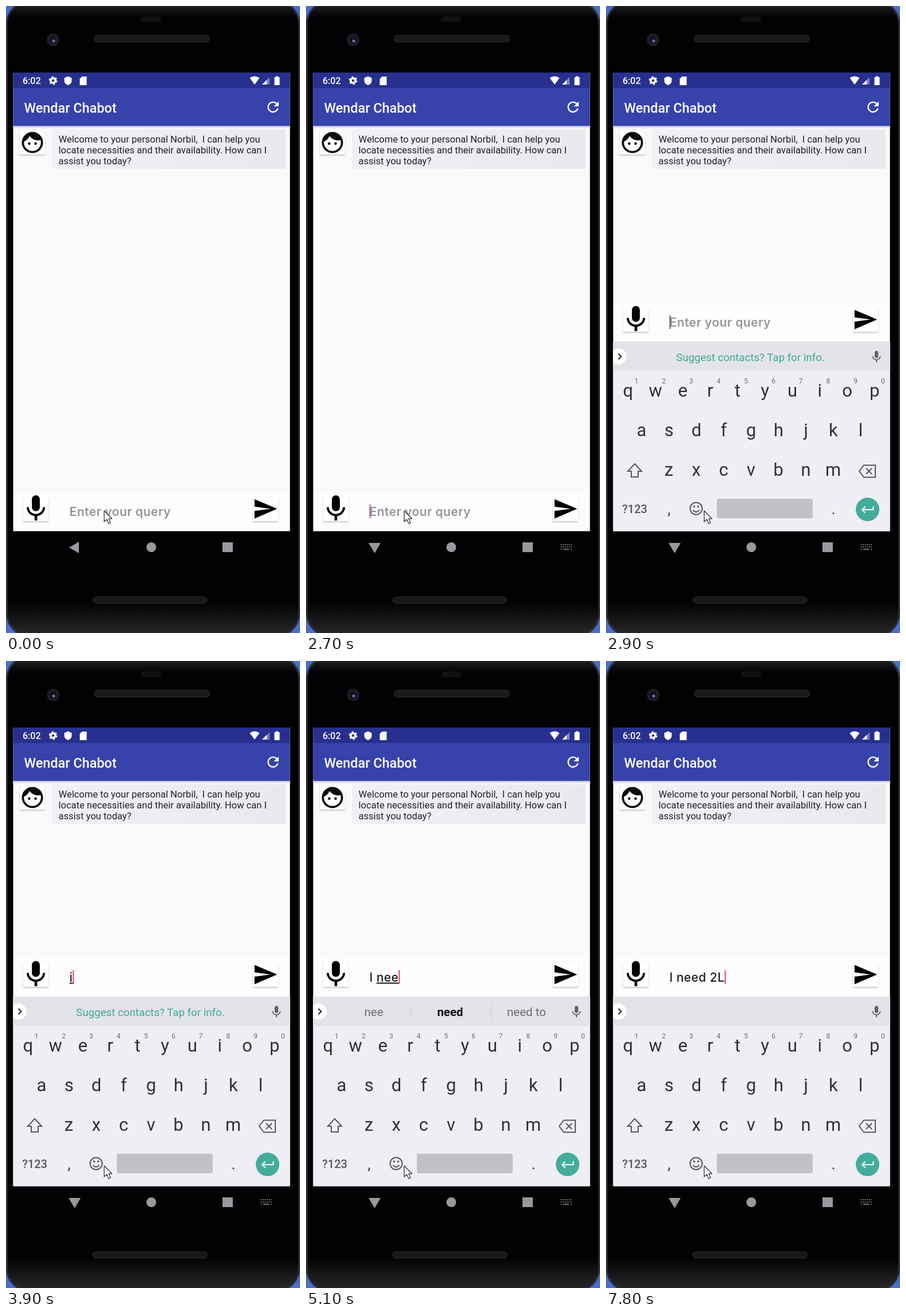
An HTML page that plays this animation: 512x1093 px, repeating every 8 s.

```html
<!DOCTYPE html>
<html lang="en">
<head>
<meta charset="utf-8">
<title>Chat assistant</title>
<style>
html, body { margin: 0; width: 100%; height: 100%; overflow: hidden; background: #4a6ccb; }
svg { display: block; width: 100%; height: 100%; }
text { font-family: Roboto, sans-serif; white-space: pre; }
.entry text { font: 500 21px Inter, sans-serif; letter-spacing: .45px; }
.entry #hint { font-weight: 600; }
.mid { text-anchor: middle; }
.line { fill: none; stroke-width: 2; }
</style>
</head>
<body>
<svg viewBox="0 0 512 1093">
  <defs>
    <linearGradient id="body" x2="0" y2="1">
      <stop stop-color="#2c2c2f"/><stop offset=".025" stop-color="#020204"/>
      <stop offset=".945" stop-color="#020204"/><stop offset="1" stop-color="#2b2b2e"/>
    </linearGradient>
    <linearGradient id="bubble"><stop stop-color="#eff1f5"/><stop offset="1" stop-color="#e9e9ed"/></linearGradient>
    <linearGradient id="drop" x2="0" y2="1"><stop stop-color="#c3c4ce"/><stop offset="1" stop-color="#fcf9fc"/></linearGradient>
    <filter id="soft" x="-10%" y="-10%" width="120%" height="130%"><feDropShadow dx="0" dy="1.5" stdDeviation="1" flood-opacity=".25"/></filter>
    <clipPath id="screen"><path d="M12.500 116H494.500V915.500H12.500z"/></clipPath>
    <path id="mic" d="M12 14c1.66 0 3-1.34 3-3V5c0-1.66-1.34-3-3-3S9 3.34 9 5v6c0 1.66 1.34 3 3 3zm5.3-3c0 3-2.54 5.1-5.3 5.1S6.7 14 6.7 11H5c0 3.41 2.72 6.23 6 6.72V21h2v-3.28c3.28-.48 6-3.3 6-6.72z"/>
  </defs>

  <!-- phone body -->
  <rect x="0" y="-9" width="512" height="1108" rx="40" fill="url(#body)"/>
  <rect x="1.500" y="-7.500" width="509" height="1105" rx="39" fill="none" stroke="#2e2e31" stroke-width="3"/>
  <rect x="236" y="18" width="34" height="10" rx="4" fill="#111113"/>
  <g fill="#19191b" stroke="#2d2d30">
    <rect x="154" y="51" width="200" height="12" rx="5"/>
    <rect x="151" y="1030" width="199" height="11" rx="5"/>
  </g>
  <circle cx="82" cy="59" r="11" fill="#1d1d21"/>
  <circle cx="82" cy="59" r="6" fill="#101326"/>
  <circle cx="83" cy="61" r="2.500" fill="#6673b0"/>

  <!-- app -->
  <g clip-path="url(#screen)">
    <path fill="#fcf9fc" d="M12 116H495V916H12z"/>
    <path fill="url(#drop)" d="M12 209H495V214H12z"/>
    <path fill="#3743ab" d="M12 143H495V209H12z"/>
    <path fill="#27308f" d="M12 116H495V143H12z"/>
  </g>
  <g fill="#fff">
    <text x="29" y="136" font-size="16" font-weight="500">6:02</text>
    <circle cx="82" cy="130" r="4" fill="none" stroke="#fff" stroke-width="3.500"/>
    <circle cx="82" cy="130" r="6.200" fill="none" stroke="#fff" stroke-width="2.400" stroke-dasharray="3.200 3.290"/>
    <path d="M108 122.500l6.500 3v4.500q0 5.500-6.500 8-6.500-2.500-6.500-8v-4.500z"/>
    <path d="M132.500 123H140.500V138H128.500V127z"/>
    <path d="M424.500 125.500Q433 119.500 441.500 125.500L433 137z"/>
    <path d="M446 137L459 124V137z" opacity=".4"/>
    <path d="M446 137L454 129V137z"/>
    <path d="M470 122.500h4v1.500h2.500V138h-9V124h2.500z"/>
    <text x="31.500" y="185.500" font-size="23.400" font-weight="500">Wendar Chabot</text>
    <path transform="translate(450.500 161.500) scale(1.220)" d="M17.65 6.35C16.2 4.9 14.21 4 12 4c-4.42 0-7.99 3.58-7.99 8s3.570 8 7.990 8c3.730 0 6.840-2.550 7.730-6h-2.080c-.82 2.330-3.040 4-5.650 4-3.310 0-6-2.690-6-6s2.690-6 6-6c1.660 0 3.140.69 4.220 1.780L13 11h7V4z"/>
  </g>
  <rect x="24" y="217" width="44" height="42" fill="#fff" filter="url(#soft)"/>
  <path transform="translate(23.800 215.800) scale(1.850)" fill="#0b0b0d" fill-rule="evenodd" d="M12 2a10 10 0 1 0 0 20 10 10 0 0 0 0-20zm0 18c-4.410 0-8-3.590-8-8 0-.29.02-.58.05-.86 2.360-1.050 4.230-2.980 5.210-5.370C11.070 8.330 14.050 10 17.420 10c.78 0 1.530-.09 2.250-.26.21.71.33 1.470.33 2.260 0 4.410-3.590 8-8 8zM9 11.750a1.250 1.250 0 1 0 0 2.500 1.250 1.250 0 0 0 0-2.500zm6 0a1.250 1.250 0 1 0 0 2.500 1.250 1.250 0 0 0 0-2.500z"/>
  <path fill="url(#bubble)" d="M80 215H487V284H80z"/>
  <g font-size="16.500" fill="#202126">
    <text x="91.500" y="238">Welcome to your personal Norbil,  I can help you</text>
    <text x="91.500" y="257">locate necessities and their availability. How can I</text>
    <text x="91.500" y="276">assist you today?</text>
  </g>

  <!-- query row -->
  <g id="entry" class="entry">
    <path fill="#fefcfe" d="M13 848H494V915H13z"/>
    <g fill="#fff" filter="url(#soft)"><path d="M30 857H74V898H30z"/><path d="M430 857H474V898H430z"/></g>
    <use href="#mic" transform="translate(24.400 848.400) scale(2.300)"/>
    <path transform="translate(429 854) scale(1.880)" d="M2 21L23 12 2 3V10L17 12 2 14z"/>
    <text id="hint" x="110.500" y="888.500" fill="#97959a">Enter your query</text>
    <text id="typed" x="110.500" y="888.500" fill="#1d1d20"><tspan id="done"></tspan><tspan id="word" text-decoration="underline"></tspan></text>
    <rect id="caret" y="869" width="2" height="24"/>
  </g>

  <!-- keyboard -->
  <g clip-path="url(#screen)"><g id="board">
    <path fill="#eeeff4" d="M12 585H495V916H12z"/>
    <path fill="#e3e4e9" d="M12 585H495V636H12z"/>
    <circle cx="22" cy="611" r="14" fill="#fff"/>
    <path class="line" stroke="#222" d="M21.500 606l5 5-5 5"/>
    <text id="tip" class="mid" x="251.500" y="618.500" font-size="18.700" fill="#43a796">Suggest contacts? Tap for info.</text>
    <g id="picks" class="mid" font-size="20.500" fill="#6c6d72">
      <path stroke="#c8c9ce" d="M182 598V624M322.500 598V624"/>
      <text x="118" y="619"></text><text x="251" y="619"></text><text x="384" y="619"></text>
    </g>
    <use href="#mic" fill="#626469" transform="translate(458.400 599) scale(1.050)"/>
    <g id="keys" class="mid" font-size="31" fill="#303238"></g>
    <g class="line" stroke="#55575c">
      <path d="M50 798L62 811H56V821H44V811H38z"/>
      <path d="M449 800.500H469V821.500H449L441 811zM453 806l10 10M463 806l-10 10"/>
      <circle cx="157" cy="876" r="10.500"/>
      <path d="M151.500 878.500Q157 885.500 162.500 878.500"/>
    </g>
    <path fill="#55575c" d="M152 871h3v3h-3zM159 871h3v3h-3z"/>
    <text class="mid" x="50" y="884" font-size="20" font-weight="500" fill="#56585d">?123</text>
    <g class="mid" font-size="27" fill="#44464b"><text x="110" y="886">,</text><text x="396" y="886">.</text></g>
    <rect x="193" y="859" width="167" height="34" rx="2" fill="#c0c2c6"/>
    <circle cx="455.500" cy="877.500" r="20.500" fill="#43ac9b"/>
    <path class="line" stroke="#fff" d="M465.500 872v6H446m5.500-5.500l-5.500 5.500 5.500 5.500"/>
  </g></g>

  <!-- navigation bar -->
  <g fill="#98989d">
    <path id="back"/>
    <circle cx="253" cy="943.500" r="8.500"/>
    <path d="M377 935H395V952H377z"/>
  </g>
  <g id="toggle" fill="none" stroke="#737378" stroke-width="2">
    <path stroke-dasharray="2 1.600" d="M443.500 939H463M443.500 943H463"/>
    <path d="M443.500 947h2M448 947h10M461 947h2"/>
  </g>
  <path fill="#fff" stroke="#33333a" stroke-width="1.300" stroke-linejoin="round" d="M171 880V899L175.500 895 179 902.500 182 901 178.800 893.800H184.500z"/>
</svg>

<script>
const el = id => document.getElementById(id);
const show = (id, on) => el(id).setAttribute("visibility", on ? "visible" : "hidden");
const LOOP = 8000, FOCUS = 2600, OPEN = 2800;

// [time, finished text, word being composed, suggestions]
const strokes = [
  [FOCUS, "", "", "tip"],
  [3800, "", "i", "tip"],
  [4400, "I ", "", "tip"],
  [4600, "I ", "n", ["n", "need", "need to"]],
  [4800, "I ", "ne", ["ne", "need", "need to"]],
  [5000, "I ", "nee", ["nee", "need", "need to"]],
  [5300, "I ", "need", ["need", "need", "need to"]],
  [5600, "I need ", "", ["a", "to", "banna"]],
  [6900, "I need 2", "", null],
  [7600, "I need 2L", "", null]
];

const label = (s, x, y, extra = "") => `<text x="${x}" y="${y}" ${extra}>${s}</text>`;
const row = (letters, x, y) => [...letters].map((c, i) => label(c, x + 47.7 * i, y)).join("");
el("keys").innerHTML = row("qwertyuiop", 38.4, 681) + row("asdfghjkl", 62, 749.5) + row("zxcvbnm", 109.5, 819) +
  [..."1234567890"].map((c, i) => label(c, 53 + 47.7 * i, 658, 'font-size="12" fill="#6b6d72"')).join("");

function draw(t) {
  const focused = t >= FOCUS, open = t >= OPEN;
  const [since, done, word, picks] = strokes.findLast(s => t >= s[0]) || strokes[0];
  const empty = !done && !word;

  el("entry").setAttribute("transform", `translate(0 ${open ? -330 : 0})`);
  show("board", open);
  el("board").setAttribute("transform", `translate(0 ${Math.max(0, 2900 - t) * 1.1})`);
  el("back").setAttribute("d", focused ? "M109 936H130L119.500 954z" : "M110 944L127 934V954z");
  show("toggle", focused);

  show("hint", empty);
  el("done").textContent = done;
  el("word").textContent = word;
  const end = empty ? 0 : el("typed").getComputedTextLength();
  el("caret").setAttribute("x", 110.5 + end);
  el("caret").setAttribute("fill", !empty ? "#e0465c" : open ? "#66646a" : "#b0598c");
  show("caret", focused && Math.floor((t - since) / 500) % 2 === 0);

  show("tip", open && picks === "tip");
  const listed = Array.isArray(picks);
  show("picks", open && listed);
  if (listed) el("picks").querySelectorAll("text").forEach((p, i) => {
    const bold = i === 1 && word;
    p.textContent = picks[i];
    p.setAttribute("font-weight", bold ? 700 : 400);
    p.setAttribute("fill", bold ? "#111" : "#6c6d72");
  });
}

const start = performance.now();
function tick() {
  const t = (performance.now() - start) % LOOP;
  draw(Math.floor(t / 100) * 100);
  requestAnimationFrame(tick);
}
tick();
</script>
</body>
</html>
```
